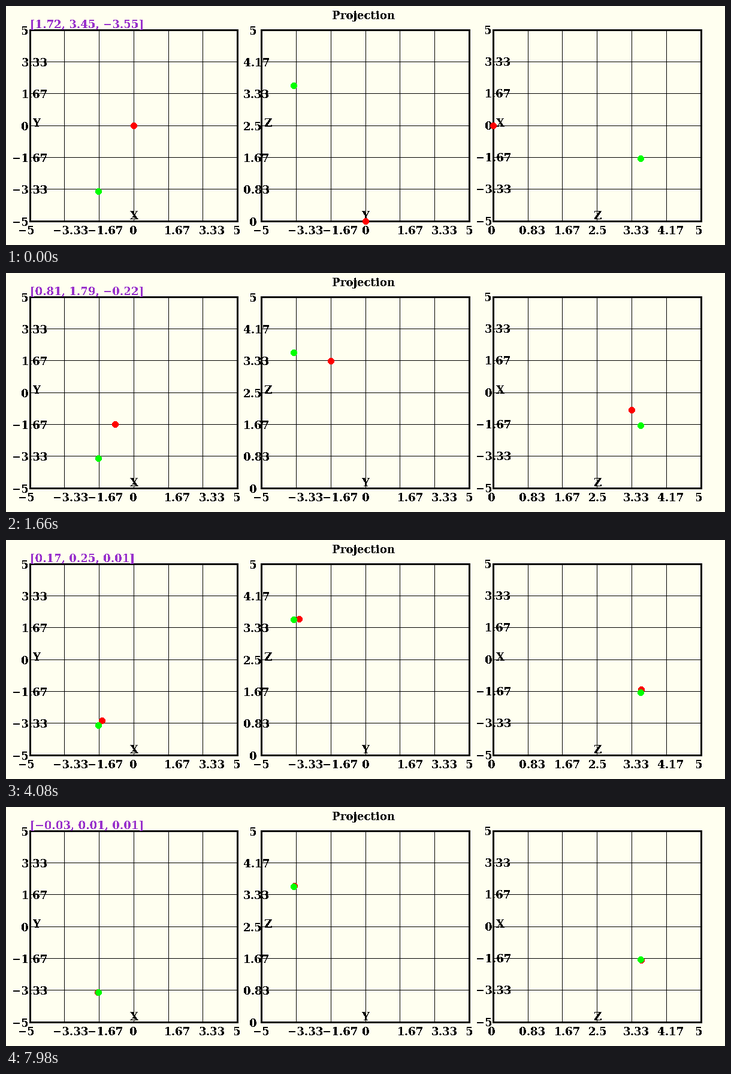
Recreate the animation shown at these times as a matplotlib script. Size 1200 px wide and 400 px high, loop 8 s.

```python
import numpy as np
import matplotlib.pyplot as plt
from matplotlib.animation import FuncAnimation
from matplotlib.collections import LineCollection
from matplotlib.patches import Circle, Rectangle

W, H, DPI = 1200, 400, 100
TICK, LOOP = 20, 8000
PX = 72 / DPI
PAPER, PURPLE = "#fffff0", "#9932cc"

plt.rcParams.update({
    "font.family": "DejaVu Serif",
    "font.weight": "bold",
    "font.size": 18.2 * PX,
    "text.antialiased": False,
})

fig = plt.figure(figsize=(W / DPI, H / DPI), dpi=DPI, facecolor=PAPER)
ax = fig.add_axes([0, 0, 1, 1])
ax.set_xlim(-0.5, W - 0.5)
ax.set_ylim(H - 0.5, -0.5)
ax.axis("off")

# ---- three panels, each showing one pair of coordinates ----
MARGIN, DIVISIONS = 40, 6
PANEL_W = (W - 4 * MARGIN) / 3
PANEL_H = H - 2 * MARGIN
BOTTOM = MARGIN + PANEL_H
RANGE = {"X": (-5, 5), "Y": (-5, 5), "Z": (0, 5)}

# (across, up, label shifts across, label shifts up, label drop)
# shifts are: basic, extra for a minus sign, extra for a decimal point
PANELS = [
    ("X", "Y", (7, 12, 0), (14, 15, 0), 7.5),
    ("Y", "Z", (5, 9, 0), (20, 0, 10), 7.5),
    ("Z", "X", (9, 0, 5), (14, 15, 0), 6.5),
]


def panel_left(k):
    return MARGIN + k * (PANEL_W + MARGIN)


def fraction(axis, value):
    low, high = RANGE[axis]
    return (value - low) / (high - low)


def tick_names(axis):
    values = np.linspace(*RANGE[axis], DIVISIONS + 1)
    return [f"{round(v, 2) + 0.0:g}".replace("-", "\u2212") for v in values]


def shift(name, rule):
    basic, minus, point = rule
    return basic + minus * ("\u2212" in name) + point * ("." in name)


def write(text, x, base, **style):
    """Text whose ink starts near x and stands on base."""
    return ax.text(x - 1, base, text, va="baseline", zorder=3, **style)


def draw_panel(k):
    across, up, x_rule, y_rule, drop = PANELS[k]
    x0 = panel_left(k)
    left, right = int(x0), int(x0 + PANEL_W + 1e-6)
    lines = []
    labels = zip(tick_names(across), tick_names(up))
    for i, (x_name, y_name) in enumerate(labels):
        gx = x0 + PANEL_W * i / DIVISIONS
        gy = BOTTOM - PANEL_H * i / DIVISIONS
        write(x_name, gx - shift(x_name, x_rule), 381.5)
        write(y_name, x0 - shift(y_name, y_rule), int(gy) + drop)
        if 0 < i < DIVISIONS:
            col, row = int(gx + 1e-6), int(gy + 1e-6)
            lines.append([(col, MARGIN), (col, BOTTOM)])
            lines.append([(left, row), (right, row)])
    ax.add_collection(LineCollection(lines, colors="black", linewidths=PX,
                                     snap=False, zorder=1))
    ax.add_patch(Rectangle((left, MARGIN), right - left, PANEL_H, fill=False,
                           ec="black", lw=3 * PX, snap=False, zorder=2))
    write(across, x0 + PANEL_W / 2 + 1.5, 356.5, ha="center")
    write(up, x0 + 5.5, 201.5)


for k in range(len(PANELS)):
    draw_panel(k)
write("Projection", 545, 21)
readout = write("", 40, 36, color=PURPLE)


def add_dots(color, z):
    return [ax.add_patch(Circle((0, 0), 4.9, fc=color, lw=0,
                                antialiased=False, zorder=z)) for _ in PANELS]


def place(dots, point):
    p = dict(zip("XYZ", point))
    for k, (across, up, *_) in enumerate(PANELS):
        x = panel_left(k) + PANEL_W * fraction(across, p[across])
        y = BOTTOM - PANEL_H * fraction(up, p[up])
        dots[k].center = (round(x), round(y))


# ---- motion: the remaining error on each axis over the update steps ----
def smooth(n, v):
    """Monotone cubic through the points (n, v), flat at both ends."""
    n, v = np.array(n, float), np.array(v, float)
    d = np.diff(v) / np.diff(n)
    m = np.zeros(len(v))
    for i in range(1, len(v) - 1):
        if d[i - 1] * d[i] > 0:
            m[i] = 2 * d[i - 1] * d[i] / (d[i - 1] + d[i])

    def value(q):
        i = min(max(np.searchsorted(n, q, "right") - 1, 0), len(d) - 1)
        h = n[i + 1] - n[i]
        s = (q - n[i]) / h
        return (v[i] * (1 + 2 * s) * (1 - s) ** 2 + v[i + 1] * s * s * (3 - 2 * s)
                + h * m[i] * s * (1 - s) ** 2 - h * m[i + 1] * s * s * (1 - s))
    return value


GOAL = np.array([-1.72, -3.45, 3.55])
KEYS = (1, 20, 35, 54, 75, 104, 132, 172)
ERROR = [
    smooth(KEYS, (1.72, 1.32, 0.84, 0.38, 0.28, 0.07, 0.002, -0.0253)),
    smooth(KEYS, (3.45, 2.92, 1.85, 0.89, 0.42, 0.13, 0.04, 0.01)),
    smooth(KEYS, (-3.55, -2.12, -0.25, 0.04, 0.02, 0.01, 0.01, 0.01)),
]

red = add_dots("#ff0000", 5)
green = add_dots("#00ff00", 6)
place(green, GOAL)


def draw(frame):
    # updates come in bursts of three, one burst every seven ticks
    burst, k = divmod(frame + 1, 7)
    step = 3 * burst + min(k, 2)
    error = np.array([e(step) for e in ERROR])
    place(red, GOAL + error)
    text = "[" + ", ".join(f"{v:.2f}" for v in error) + "]"
    readout.set_text(text.replace("-", "\u2212"))
    return [*red, readout]


anim = FuncAnimation(fig, draw, frames=LOOP // TICK, interval=TICK,
                     repeat=True, repeat_delay=0, blit=False)
plt.show()
```
